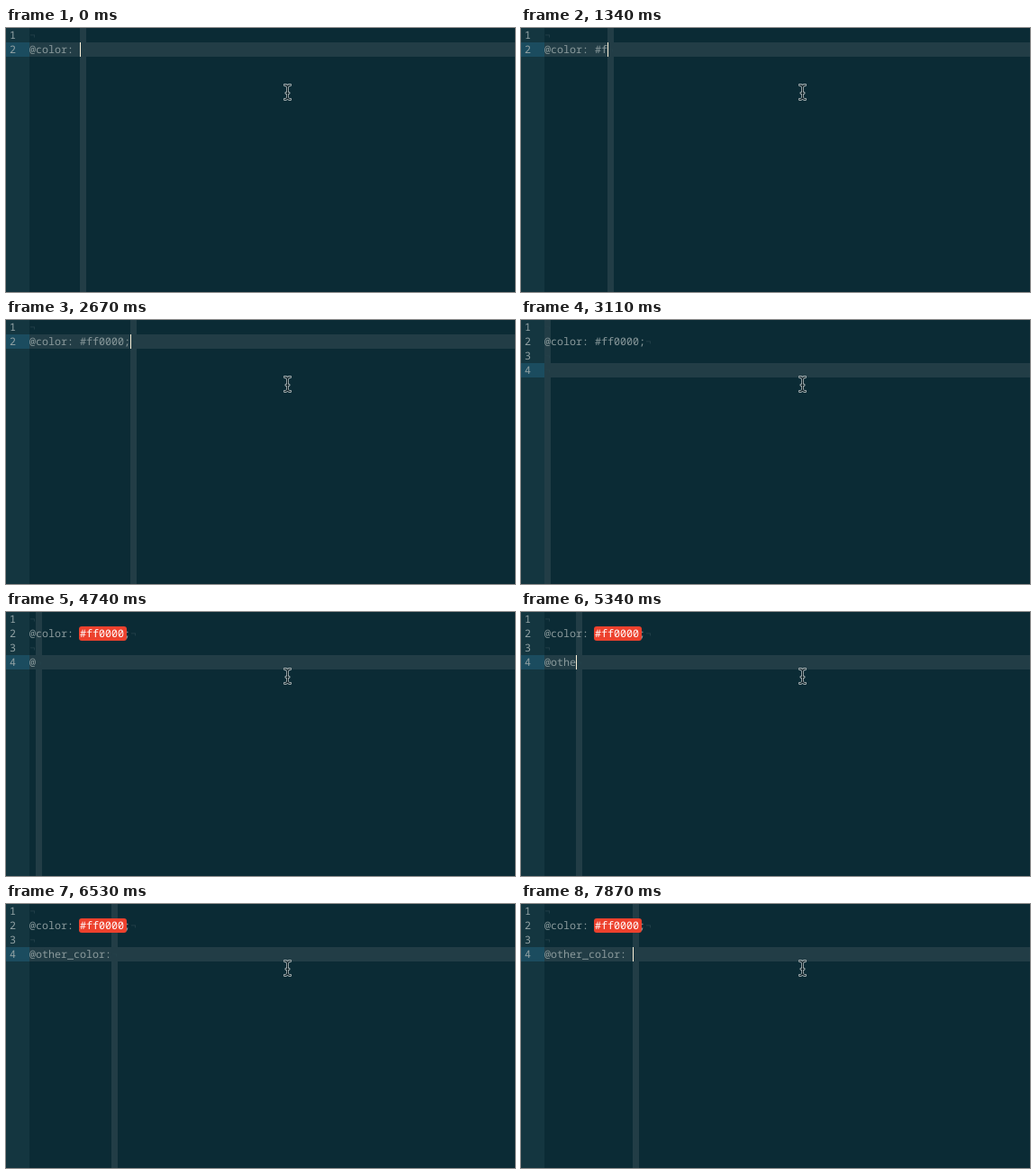
An HTML page for the animation above (8000 ms loop, 565 by 294 pixels).

```html
<!DOCTYPE html>
<html lang="en">
<head>
<meta charset="utf-8">
<title>Editor typing</title>
<style>
  html, body { margin: 0; width: 100%; height: 100%; overflow: hidden; background: #0b2b35; }
  svg { display: block; width: 565px; height: 294px; }
  text {
    font: 11.6667px "Noto Sans Mono", monospace;
    fill: #8a9a9c;
    white-space: pre;
    text-rendering: geometricPrecision;
  }
  .num { fill: #93a3a5; }
  .eol { fill: #25424b; }
  .mark { fill: #223d46; }
  .lit { fill: #fff; }
  .beam { fill: none; stroke-linecap: round; }
</style>
</head>
<body>
<svg viewBox="0 0 565 294">
  <rect width="565" height="294" fill="#0b2b35"/>
  <rect width="26" height="294" fill="#143640"/>
  <rect id="line" class="mark" x="26" width="539" height="16"/>
  <rect id="lineNum" width="26" height="16" fill="#1b4c5f"/>
  <rect id="column" class="mark" y="0" width="7" height="294"/>
  <rect id="chip" x="81" y="16" width="53" height="16" rx="3" fill="#ed412d"/>
  <g id="rows"></g>
  <text x="26" y="28">@color: <tspan id="hex"></tspan><tspan id="semi"></tspan></text>
  <text id="other" x="26" y="60"></text>
  <rect id="caret" width="1" height="16" fill="#fbf1d8"/>
  <g class="beam">
    <path id="beam" stroke="#a3afb1" stroke-width="2.8"
      d="M309.5 63.5q2.5 0 3 2q.5-2 3-2M312.5 65.5v12M309.5 79.5q2.5 0 3-2q.5 2 3 2M311 72.5h3"/>
    <use href="#beam" id="core"/>
    <path stroke="#0b1c22" stroke-width="1.2"
      d="M309.5 63.5q2.5 0 3 2q.5-2 3-2M312.5 65.5v12M309.5 79.5q2.5 0 3-2q.5 2 3 2M311 72.5h3"/>
  </g>
</svg>
<script>
  const LOOP = 8000, LEFT = 26, CHAR = 7, ROW = 16;
  const value = "#ff0000;";
  const valueKeys = [890, 1340, 1490, 1780, 1930, 2220, 2370, 2670];
  const name = "@other_color: ";
  const nameKeys = [4450, 4890, 5040, 5190, 5340, 5490, 5640,
                    5930, 6080, 6230, 6380, 6380, 6530, 6680];
  const newlines = [2820, 3110];
  const blinks = [290, 740, 1040, 1340, 3110, 3410, 3860, 4300,
                  4740, 5190, 5640, 6080, 6530, 7120, 7420, 7870];
  const chipTime = 3560;

  const $ = id => document.getElementById(id);
  const passed = (times, t) => times.filter(at => at <= t).length;
  const set = (el, attrs) => {
    for (const key in attrs) el.setAttribute(key, attrs[key]);
  };
  const show = (el, on) => set(el, { visibility: on ? "visible" : "hidden" });

  function addText(cls, x, row, str) {
    const el = document.createElementNS("http://www.w3.org/2000/svg", "text");
    set(el, { class: cls, x, y: row * ROW + 12 });
    el.textContent = str;
    $("rows").append(el);
    return el;
  }

  const rows = [0, 1, 2, 3].map(row => ({
    num: addText("num", 4, row, row + 1),
    eol: addText("eol", LEFT, row, "¬")
  }));

  function draw(t) {
    const row = 1 + passed(newlines, t);
    const typed = value.slice(0, passed(valueKeys, t));
    const other = name.slice(0, passed(nameKeys, t));
    const lengths = [0, 8 + typed.length, 0, other.length];
    const x = LEFT + lengths[row] * CHAR;
    const y = row * ROW;

    $("hex").textContent = typed.slice(0, 7);
    $("semi").textContent = typed.slice(7);
    $("other").textContent = other;

    rows.forEach(({ num, eol }, i) => {
      show(num, i <= row);
      show(eol, i <= row);
      set(eol, { x: LEFT + lengths[i] * CHAR });
    });

    set($("line"), { y });
    set($("lineNum"), { y });
    set($("column"), { x });
    set($("caret"), { x, y });
    show($("caret"), passed(blinks, t) % 2 === 0);

    const lit = t >= chipTime;
    show($("chip"), lit);
    $("hex").classList.toggle("lit", lit);
  }

  const start = performance.now();
  function tick() {
    draw((performance.now() - start) % LOOP);
    requestAnimationFrame(tick);
  }
  tick();
</script>
</body>
</html>
```
